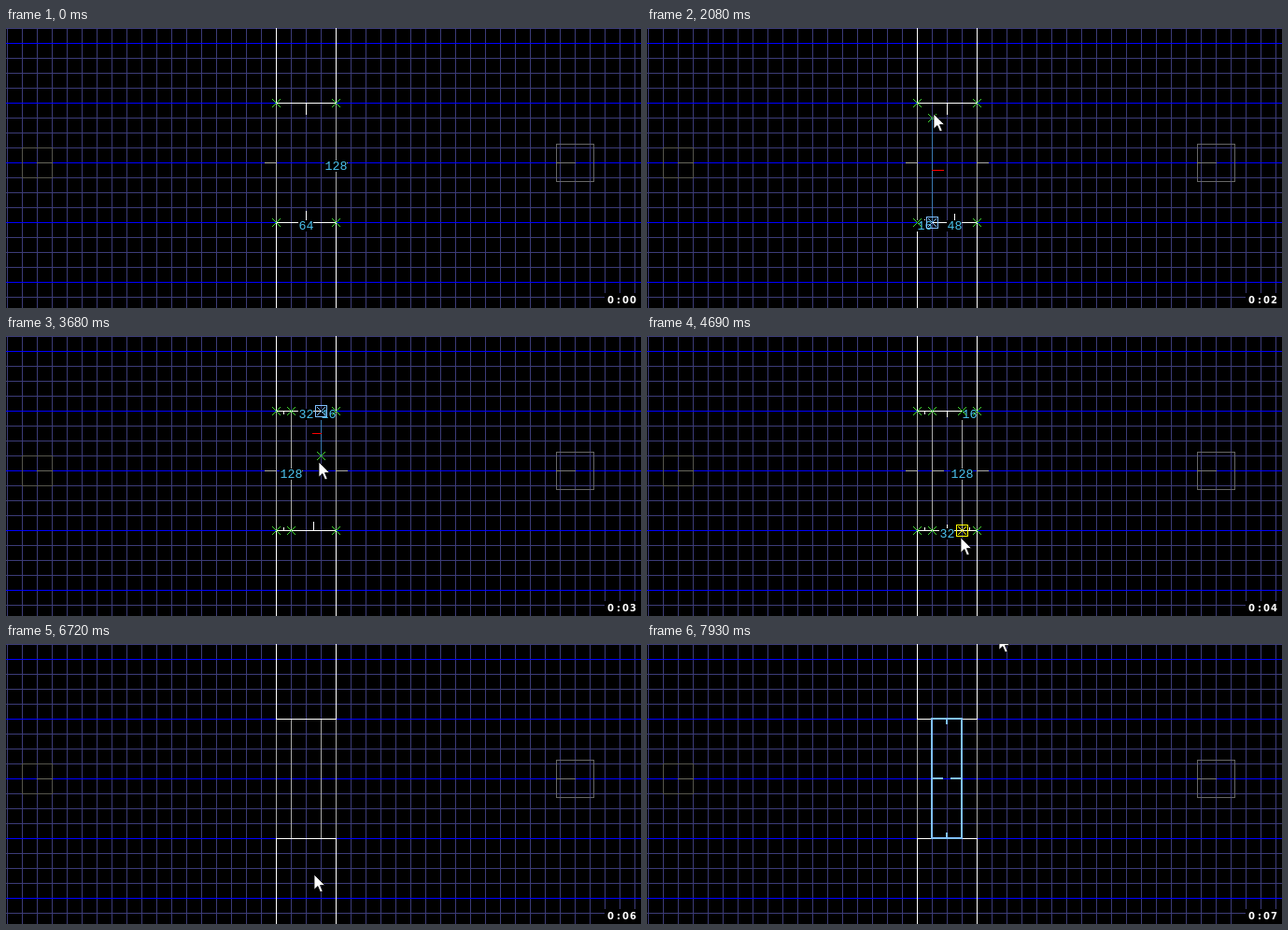
Write an HTML page that moves like this. It is 680 px wide and 300 px high and loops after 8 s.

```html
<!DOCTYPE html>
<html lang="en">
<head>
<meta charset="utf-8">
<title>Map editor: splitting a passage</title>
<style>
html, body { margin: 0; width: 100%; height: 100%; overflow: hidden; background: #000; }
svg { display: block; width: 680px; height: 300px; }
.label { font: 13.33px "Liberation Mono", "DejaVu Sans Mono", monospace; fill: #4cc4f0; text-anchor: middle; }
.clock { font: bold 10px "DejaVu Sans", sans-serif; fill: #fff; }
</style>
</head>
<body>
<svg viewBox="0 0 680 300" fill="none">
  <g transform="translate(.5 .5)" shape-rendering="crispEdges" stroke-linecap="square">
    <g id="grid"></g>
    <g id="map"></g>
  </g>
  <path id="cursor" d="M0 0V16.2L3.9 12.6L6.6 19L9.2 17.9L6.5 11.6H11.6Z" fill="#fff" stroke="#000" stroke-width=".8"/>
  <rect x="641" y="284" width="39" height="16" fill="#000"/>
  <text id="clock" class="clock" x="644 654 660 668" y="295"></text>
</svg>
<script>
const LOOP = 8000;
const WHITE = '#fff', GREY = '#aaa', GREEN = '#40d830', YELLOW = '#ff0',
      SELECTED = '#80c0ff', RED = '#f00', PENDING = '#3a78b0';
const LEFT = 289, A = 305, B = 337, RIGHT = 353, TOP = 80, BOTTOM = 208;
const byId = id => document.getElementById(id);

// Screen refreshes: runs of 150 ms, shorter right after a full second
const ticks = [0];
for (const [from, to] of [[530, 4230], [4540, 5240], [5860, 5860], [6260, 6260], [6570, 7170], [7480, 7930]])
  for (let t = from; t <= to; t += t % 1000 >= 980 ? 100 : 150) ticks.push(t);

// Pointer visits: time, x, y
const visits = [
  { end: 5240, keys: [
    [530, 340, 288], [1230, 306, 210], [1680, 305, 208], [2080, 307, 92], [2230, 306, 82],
    [2530, 306, 82], [3080, 337, 82], [3230, 336, 81], [3530, 335, 105], [3680, 335, 135],
    [3830, 336, 162], [4080, 337, 202], [4230, 336, 210], [4540, 336, 212], [4690, 336, 216],
    [4840, 338, 238], [5090, 346, 292]] },
  { end: LOOP, keys: [
    [6570, 338, 280], [6870, 322, 214], [7020, 318, 190], [7170, 316, 174], [7480, 322, 160],
    [7630, 338, 118], [7780, 358, 54], [7930, 377, -10]] }
];

const labelSets = [
  [0, [[RIGHT, 144, 128], [321, BOTTOM, 64]]],
  [1380, [[297, BOTTOM, 16], [329, BOTTOM, 48]]],
  [2380, [[297, TOP, 16], [329, TOP, 48], [A, 144, 128]]],
  [3230, [[321, TOP, 32], [345, TOP, 16], [A, 144, 128]]],
  [4540, [[345, TOP, 16], [B, 144, 128], [321, BOTTOM, 32]]],
  [5860, []]
];

const marks = [
  [1380, 1680, A, BOTTOM, YELLOW], [1680, 2380, A, BOTTOM, SELECTED],
  [2380, 2680, A, TOP, YELLOW], [3230, 4540, B, TOP, SELECTED], [4540, 4840, B, BOTTOM, YELLOW]
];

function pointer(t) {
  const visit = visits.find(v => t >= v.keys[0][0] && t < v.end);
  if (!visit) return null;
  const keys = visit.keys;
  let i = 0;
  while (i < keys.length - 1 && keys[i + 1][0] <= t) i++;
  const a = keys[i], b = keys[i + 1] || a;
  const k = a === b ? 0 : (t - a[0]) / (b[0] - a[0]);
  return { x: a[1] + (b[1] - a[1]) * k, y: a[2] + (b[2] - a[2]) * k };
}

const path = (d, color, width = 1) => `<path d="${d}" stroke="${color}" stroke-width="${width}"/>`;
const line = (x1, y1, x2, y2, color, width) => path(`M${x1} ${y1}L${x2} ${y2}`, color, width);
const box = (x, y, w, h, color, width) => path(`M${x} ${y}h${w}v${h}h${-w}z`, color, width);
const cross = (x, y, color) => path(`M${x - 4} ${y - 4}l8 8M${x + 4} ${y - 4}l-8 8`, color);

// Short normal on the right-hand side of a wall
function normal(x1, y1, x2, y2, color, width) {
  const len = Math.hypot(x2 - x1, y2 - y1);
  if (!len) return '';
  const k = Math.min(12, len * 3 / 16) / len;
  const mx = (x1 + x2) / 2, my = (y1 + y2) / 2;
  return line(mx, my, mx - (y2 - y1) * k, my + (x2 - x1) * k, color, width);
}

function label([x, y, n]) {
  const w = String(n).length * 8;
  return `<rect x="${x - w / 2 - .5}" y="${y - 2.5}" width="${w}" height="12" fill="#000"/>` +
    `<text class="label" x="${x}" y="${y + 7}">${n}</text>`;
}

function gridArt() {
  let out = '';
  for (let x = 1; x < 680; x += 16) out += line(x, 0, x, 300, '#3c3c78');
  for (let y = 0; y < 300; y += 16) if (y % 64 !== 16) out += line(0, y, 680, y, '#3c3c78');
  for (let y = 16; y < 300; y += 64) out += line(0, y, 680, y, '#00f');
  out += box(17, 128, 32, 32, '#55554c') + line(33, 144, 49, 144, '#66665c');
  out += box(589, 124, 40, 40, '#666') + line(589, 144, 609, 144, '#777');
  for (const x of [LEFT, RIGHT])
    out += line(x, -2, x, TOP, WHITE) + line(x, BOTTOM, x, 302, WHITE);
  return out;
}

function mapArt(t, tip) {
  const editing = t < 5860;
  const top = [LEFT, t >= 2380 && A, t >= 3230 && B, RIGHT].filter(Boolean);
  const bottom = [LEFT, t >= 1380 && A, t >= 4230 && B, RIGHT].filter(Boolean);
  const walls = [[LEFT, TOP, LEFT, BOTTOM, GREY], [RIGHT, BOTTOM, RIGHT, TOP, GREY]];
  if (t >= 2380) walls.push([A, BOTTOM, A, TOP, GREY]);
  if (t >= 4540) walls.push([B, TOP, B, BOTTOM, GREY]);
  for (let i = 1; i < top.length; i++) walls.push([top[i - 1], TOP, top[i], TOP, WHITE]);
  for (let i = 1; i < bottom.length; i++) walls.push([bottom[i], BOTTOM, bottom[i - 1], BOTTOM, WHITE]);

  let out = walls.map(w => line(...w)).join('');
  if (editing) out += walls.map(w => normal(...w)).join('');

  // Wall being drawn, its free end snapped to the grid
  const start = t >= 1680 && t < 2380 ? [A, BOTTOM] : t >= 3230 && t < 4540 ? [B, TOP] : null;
  let end = null;
  if (start) {
    end = [start[0], Math.round(tip.y / 16) * 16];
    out += line(...start, ...end, PENDING) + normal(...start, ...end, RED);
  }

  out += labelSets.filter(s => s[0] <= t).pop()[1].map(label).join('');

  if (editing) {
    out += top.map(x => cross(x, TOP, GREEN)).join('') + bottom.map(x => cross(x, BOTTOM, GREEN)).join('');
    if (end) out += cross(...end, GREEN);
    for (const [from, to, x, y, color] of marks)
      if (t >= from && t < to) out += cross(x, y, color) + box(x - 6, y - 6, 12, 12, color);
  }

  const picked = t >= 7480;
  const hovered = tip && t > 6500 && tip.y < BOTTOM;
  if (picked || hovered) {
    const color = picked ? SELECTED : YELLOW;
    let room = box(A, TOP, B - A, BOTTOM - TOP, color, 2);
    if (picked) {
      const sides = [[A, TOP, B, TOP], [B, TOP, B, BOTTOM], [B, BOTTOM, A, BOTTOM], [A, BOTTOM, A, TOP]];
      room += sides.map(s => normal(...s, color, 2)).join('');
    }
    out += `<g transform="translate(-.5 -.5)" stroke-linecap="butt">${room}</g>`;
  }
  return out;
}

function draw(t) {
  const tip = pointer(t);
  byId('map').innerHTML = mapArt(t, tip);
  byId('cursor').setAttribute('visibility', tip ? 'visible' : 'hidden');
  if (tip) byId('cursor').setAttribute('transform', `translate(${Math.round(tip.x)} ${Math.round(tip.y)})`);
  byId('clock').textContent = `0:0${Math.floor(t / 1000)}`;
}

byId('grid').innerHTML = gridArt();
let shown = -1;
const origin = performance.now();
function update() {
  const now = (performance.now() - origin) % LOOP;
  const t = ticks.filter(v => v <= now).pop();
  if (t !== shown) draw(shown = t);
  requestAnimationFrame(update);
}
update();
</script>
</body>
</html>
```
